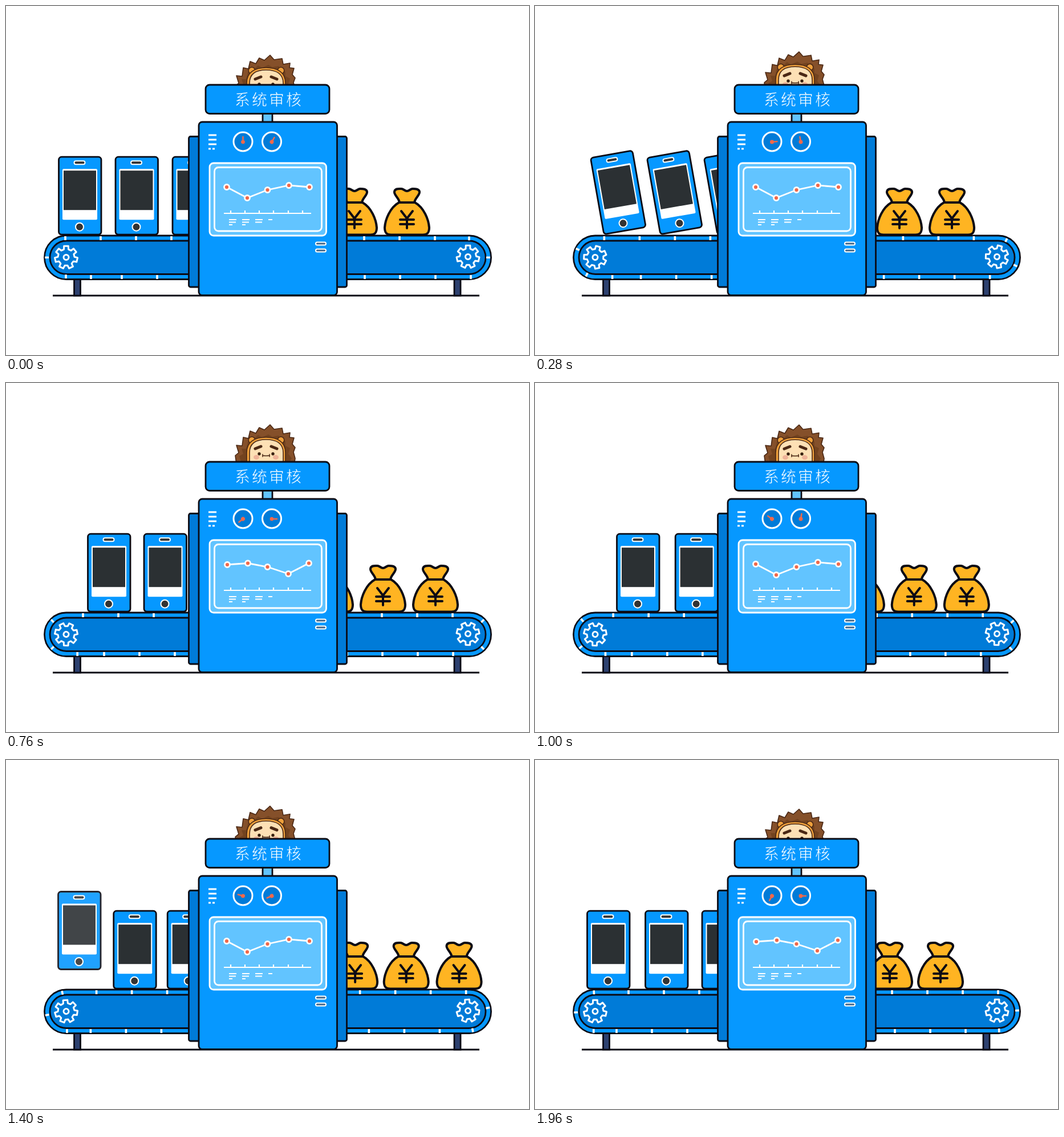
Write an HTML page that moves like this. It is 917 px wide and 611 px high and loops after 2 s.

```html
<!DOCTYPE html>
<html lang="zh">
<meta charset="utf-8">
<title>系统审核</title>
<style>
  html, body { margin: 0; width: 100%; height: 100%; overflow: hidden; background: #fff; }
  svg { display: block; width: 100%; height: 100%; }
  .ink { stroke: #0b0b14; stroke-width: 2.8; }
  .white { stroke: #fff; stroke-width: 2.8; fill: none; }
  .blue { fill: #0698ff; }
  .deep { fill: #007bd8; }
  .sky { fill: #62c4ff; }
  .round { stroke-linecap: round; stroke-linejoin: round; }
</style>
<svg viewBox="0 0 917 611">
  <defs>
    <g id="phone">
      <rect class="ink blue" x="2" y="-136.5" width="74.5" height="136" rx="5"/>
      <rect x="29" y="-129.500" width="19" height="6" rx="3" fill="#333" stroke="#fff" stroke-width="2"/>
      <rect x="8.500" y="-115.500" width="61" height="89" rx="2" fill="#fff"/>
      <rect x="10.500" y="-112.500" width="57" height="69" fill="#2b3033"/>
      <circle cx="38.500" cy="-14" r="7" fill="#333" stroke="#fff" stroke-width="2"/>
    </g>
    <g id="bag" class="ink round" style="stroke-width:4" fill="#ffb422">
      <path d="M-13-58C-14-66-23-71-22-77C-21-83-14-82-10-82C-6-82-4-78 0-78C4-78 6-82 10-82C15-82 21-82 22-77C23-71 14-66 13-58Z"/>
      <path d="M-14-58H14C30-49 38-28 39-14C39-4 35-1.5 28-1.5H-28C-35-1.5-39-4-39-14C-38-28-30-49-14-58Z"/>
      <path fill="none" d="M-10-43L0-30L10-43M0-30V-13M-12-28H12M-12-20H12"/>
    </g>
    <g id="gear" class="white round" style="stroke-width:3">
      <path id="teeth"/>
      <circle r="4.5"/>
    </g>
    <g id="needle" fill="#f2694a" stroke="#f2694a">
      <circle r="3"/>
      <path d="M0 0V-9" stroke-width="2.6" stroke-linecap="round"/>
    </g>
  </defs>

  <g class="ink" fill="#2d4170">
    <path d="M82 507H830"/>
    <rect x="119.5" y="478" width="11" height="29"/>
    <rect x="786" y="478" width="11" height="29"/>
  </g>
  <rect class="ink blue" x="67.5" y="402" width="783" height="76.5" rx="38"/>
  <rect class="ink deep" x="77" y="411" width="764" height="58.5" rx="29"/>
  <path id="ticks" class="white" style="stroke-width:3.6"/>
  <use class="gear" href="#gear"/>
  <use class="gear" href="#gear"/>

  <g id="phones">
    <use href="#phone"/><use href="#phone"/><use href="#phone"/><use href="#phone"/>
  </g>
  <g id="bags">
    <use href="#bag"/><use href="#bag"/><use href="#bag"/>
  </g>

  <g id="lion" class="round" stroke="#4a2815" stroke-width="1.6">
    <path fill="#85502a" d="M405 150L402 127L408 122L404 109L414 110L416 95L425 97L428 84L438 88L444 78L453 82L463 73L470 81L484 79L486 89L498 87L497 95L505 96L502 107L507 113L504 121L507 132L504 150Z"/>
    <path fill="#73431f" stroke="none" d="M412 138L409 128L416 124L413 115L421 115L424 103L434 98L442 91L449 95L460 90L467 94L478 92L482 98L490 102L490 110L498 114L495 124L501 132L496 140Z"/>
    <g fill="#f0a13c">
      <circle cx="431" cy="100" r="5.8"/>
      <circle cx="482" cy="100" r="5.8"/>
      <path d="M422 150V122C422 103 436 95 456 95C476 95 490 103 490 122V150Z"/>
    </g>
    <path fill="#fde0b5" d="M427 150V122C427 106 438 99 456 99C474 99 486 106 486 122V150Z"/>
    <g fill="#efb398" stroke="none">
      <ellipse cx="439" cy="130" rx="5" ry="4"/>
      <ellipse cx="473" cy="130" rx="5" ry="4"/>
    </g>
    <path stroke-width="5" d="M437 115L447 111M465 111L475 115"/>
    <g fill="#38200f" stroke="none">
      <circle cx="444" cy="124" r="2.7"/>
      <circle cx="468" cy="124" r="2.7"/>
    </g>
    <path fill="none" d="M450 125V129M450 127Q456 128 462 127M462 125V129"/>
  </g>

  <g class="ink">
    <rect class="deep" x="320.5" y="228.500" width="20" height="263.500" rx="3"/>
    <rect class="deep" x="577" y="228.500" width="20.500" height="263.500" rx="3"/>
    <rect class="sky" x="450" y="186" width="17" height="20"/>
    <rect class="blue" x="350" y="138" width="217" height="50.500" rx="7"/>
    <rect class="blue" x="338" y="203" width="242.500" height="303.500" rx="6"/>
  </g>
  <text x="401" y="174" font-size="27" font-weight="300" letter-spacing="3"
    fill="#fff" stroke="#0698ff" stroke-width=".6"
    font-family="'Noto Sans CJK SC','Noto Sans CJK',sans-serif">系统审核</text>

  <path class="white" style="stroke-width:3.2" d="M355 226H369M355 234H369M355 242H369M355 250H359M362 250H366"/>
  <g class="white" style="stroke-width:3">
    <circle class="deep" cx="415.500" cy="237.500" r="16.500"/>
    <circle class="deep" cx="466" cy="237.500" r="16.500"/>
  </g>
  <use class="needle" href="#needle"/>
  <use class="needle" href="#needle"/>

  <g class="white">
    <rect class="sky" x="357" y="275" width="204.500" height="127" rx="7"/>
    <rect class="sky" x="365.500" y="282.500" width="188" height="111.500" rx="7"/>
    <path style="stroke-width:2.2" d="M382 363H535M394 363V358M419 363V358M444 363V358M469 363V358M495 363V358M520 363V358"/>
    <path style="stroke-width:2" d="M391 374H404M391 378.500H403M391 383H397M414 374H427M414 378.500H426M414 383H420M437 374H450M437 378.500H449M460 374H467"/>
    <polyline id="line"/>
    <g id="dots" fill="#f2694a">
      <circle r="4.500"/><circle r="4.500"/><circle r="4.500"/><circle r="4.500"/><circle r="4.500"/>
    </g>
    <g fill="#46698a" style="stroke-width:2">
      <rect x="543" y="413.500" width="18" height="5" rx="2.500"/>
      <rect x="543" y="425.500" width="18" height="5" rx="2.500"/>
    </g>
  </g>
</svg>
<script>
const $ = id => document.getElementById(id);
const all = sel => [...document.querySelectorAll(sel)];
const clamp = v => Math.max(0, Math.min(1, v));
const ramp = (t, a, b) => clamp((t - a) / (b - a));
const ease = (t, a, b) => (1 - Math.cos(Math.PI * ramp(t, a, b))) / 2;
const place = (el, x, y, turn = 0) =>
  el.setAttribute('transform', `translate(${x} ${y}) rotate(${turn})`);

// Two pushes: forward to `mid`, a pause, then on to `end`
const push = (t, mid, end, a = 870, b = 1610) =>
  mid * ease(t, 0, 520) + (end - mid) * ease(t, a, b);

// Linear interpolation through [time, value] pairs
function track(t, keys) {
  const i = Math.max(1, keys.findIndex(k => k[0] >= t));
  const [[a, u], [b, v]] = [keys[i - 1], keys[i]];
  return u + (v - u) * (t - a) / (b - a);
}

const gears = all('.gear'), needles = all('.needle');
const phones = [...$('phones').children], bags = [...$('bags').children];
const dots = [...$('dots').children];
const charts = [
  [[387, 317], [423, 336], [458.5, 322], [496, 314], [532, 317]],
  [[388, 318], [424, 315.5], [458.5, 322], [495, 334], [531, 315.5]]
];

const TEETH = 7, PITCH = 360 / TEETH;
let teeth = '';
for (let i = 0; i < TEETH; i++)
  for (const [off, r] of [[-16, 14.5], [-11, 20], [11, 20], [16, 14.5]]) {
    const a = (i * PITCH + off) * Math.PI / 180;
    teeth += `${teeth ? 'L' : 'M'}${r * Math.sin(a)} ${-r * Math.cos(a)}`;
  }
$('teeth').setAttribute('d', teeth + 'Z');

const STEP = 62, LEFT = 105, RIGHT = 812, MID = 440.2;

function drawTicks(s) {
  let d = '';
  const flat = (x, top) => d += `M${x} ${top ? 403 : 471}v7`;
  const arc = (cx, a) => {
    const c = Math.cos(a), n = Math.sin(a);
    d += `M${cx + 30 * c} ${MID + 30 * n}L${cx + 36.8 * c} ${MID + 36.8 * n}`;
  };
  for (let k = 0; k < 4; k++) {
    flat(104 + STEP * k + s, true);
    flat(203 + STEP * k - s, false);
    flat(566 + STEP * k + s, true);
    flat(629 + STEP * k - s, false);
  }
  flat(149 - 0.77 * s, false);
  // A quarter of each end takes one step
  const q = Math.PI / 2, f = s / STEP;
  for (let k = 0; k < 2; k++) {
    arc(LEFT, q + (k + f) * q);
    arc(RIGHT, -q + (k + f) * q);
  }
  $('ticks').setAttribute('d', d);
}

function draw(t) {
  const belt = push(t, 31, 60);
  drawTicks(belt);
  const spin = belt / 60 * PITCH;
  place(gears[0], 105.5, 440, spin);
  place(gears[1], 810, 439, spin);

  const tilt = t < 560 ? -10 * Math.sin(Math.PI * t / 560) : 0;
  place(phones[0], 90.5 + push(t, 51, 101, 1000, 1500), 400.7, tilt);
  place(phones[1], 190 + push(t, 50, 101, 860, 1620), 400.7, tilt);
  place(phones[2], 290 + push(t, 50, 101), 400.7, tilt);
  place(phones[3], 89.5, 254.7 + 146 * ease(t, 1080, 1550));
  phones[3].setAttribute('opacity', ramp(t, 1060, 1440));

  place(bags[0], 519 + push(t, 50, 103), 402);
  place(bags[1], 611 + push(t, 50, 100), 402);
  // The last bag tips over the end of the belt
  const k = Math.max(0, t - 1400), r = k / 200;
  const ride = 703 + push(Math.min(t, 1400), 50, 101);
  place(bags[2], ride + 0.12 * k + 0.00021 * k * k, 402 + 2.6 * r ** 3.3, 24 * r ** 1.2);
  bags[2].setAttribute('opacity', 1 - ramp(t, 1760, 1920));

  place($('lion'), 0, 13 * (1 - ease(t, 0, 600) + ease(t, 920, 1780)));

  place(needles[0], 415.5, 238, track(t, [[0, 0], [1080, 330], [2000, 204]]));
  place(needles[1], 466, 238, track(t, [[0, 30], [280, -10], [760, 90], [1160, -45], [2000, -281]]));

  const chart = charts[Math.floor(t / 500) % 2];
  $('line').setAttribute('points', chart.join(' '));
  dots.forEach((dot, i) => place(dot, ...chart[i]));
}

const start = performance.now();
function frame() {
  const t = (performance.now() - start) % 2000;
  draw(Math.floor(t / 40) * 40);
  requestAnimationFrame(frame);
}
frame();
</script>
</html>
```
